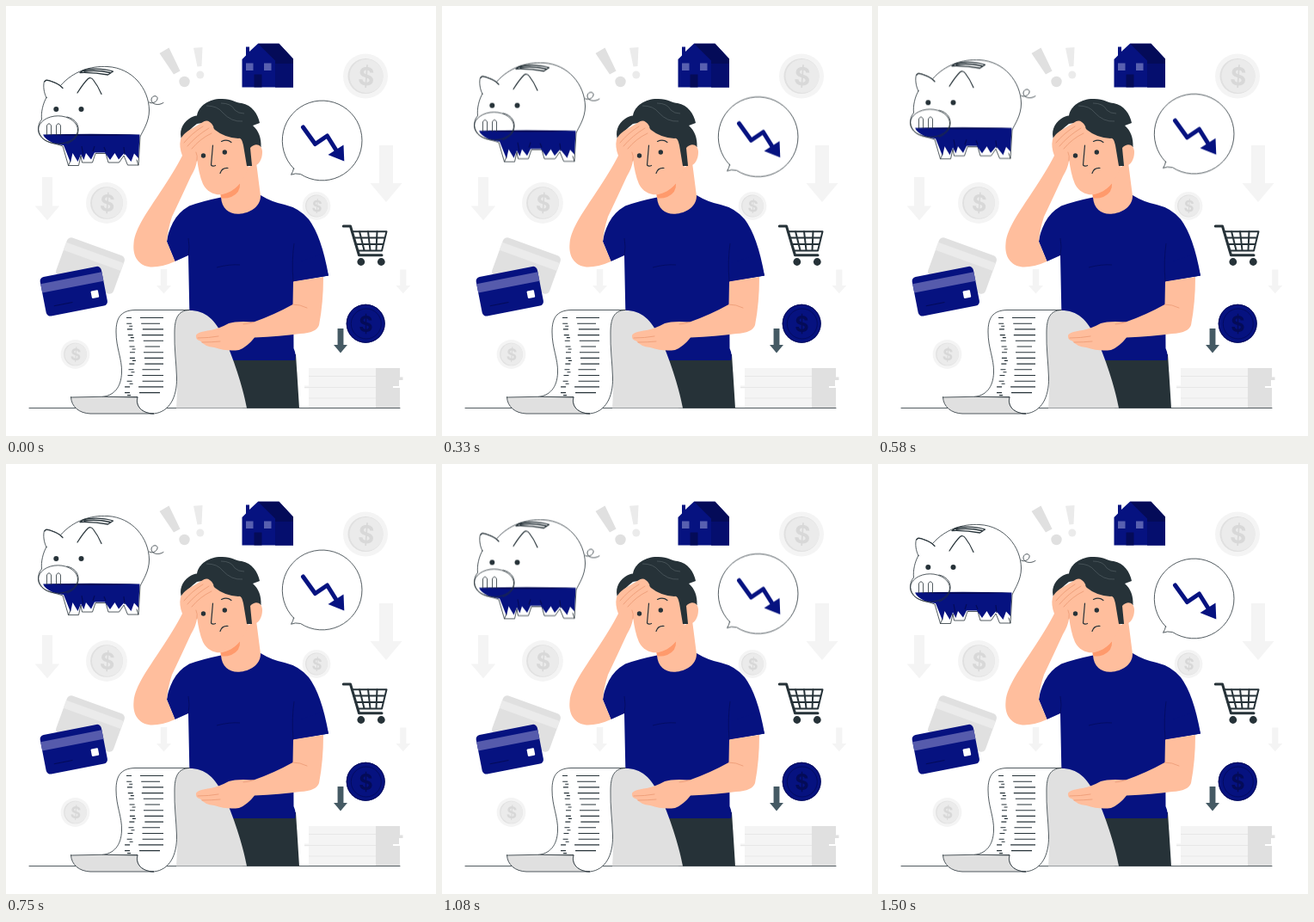
Recreate the animation shown at these times as an HTML page. Size 500 px wide and 500 px high, loop 1540 ms.

```html
<!DOCTYPE html>
<html lang="en">
<head>
<meta charset="utf-8">
<title>Money worries</title>
<style>
  html, body { margin: 0; width: 100%; height: 100%; overflow: hidden; background: #fff; }
  svg { display: block; width: 100vw; height: 100vh; }
  .navy { fill: #061280; }
  .deep { fill: #040b58; }
  .dark { fill: #263238; }
  .skin { fill: #ffbe9d; }
  .g1 { fill: #e0e0e0; }
  .g2 { fill: #ebebeb; }
  .g3 { fill: #f4f4f4; }
  .white { fill: #fff; }
  .ink { stroke: #263238; stroke-width: .8; stroke-linecap: round; stroke-linejoin: round; }
  .line { fill: none; }
  .crease { fill: none; stroke: #eb9a74; stroke-width: .8; stroke-linecap: round; }
  text { font: 700 29px Inter, "Open Sans", sans-serif; text-anchor: middle; }
  .float { animation: float 1540ms linear infinite; }
  @keyframes float {
    0%, 97.4%, 100% { transform: translateY(0); }
    48.7% { transform: translateY(-10px); }
  }
</style>
</head>
<body>
<svg viewBox="0 0 500 500" preserveAspectRatio="none">
  <defs>
    <g id="coin">
      <circle class="g3" r="26"/>
      <circle class="g1" r="20.5"/>
      <circle class="g2" cx="1" r="19.5"/>
      <text class="g1" x="1" y="10.5" transform="rotate(4)" style="fill:#d8d8d8">$</text>
    </g>
    <path id="down" d="M-8 0H8V44H18.5L0 66L-18.5 44H-8Z"/>
  </defs>

  <!-- backdrop -->
  <g class="g1">
    <path d="M178.500 55L189.500 48.500L202.500 75.500L195 79.500Z"/>
    <circle cx="207.500" cy="88" r="6.200"/>
  </g>
  <g class="g2">
    <path d="M218 48.800L228.500 48L227.500 70L222.500 70.500Z"/>
    <circle cx="225.800" cy="80" r="4.500"/>
  </g>
  <use href="#coin" x="418" y="81.500"/>
  <use href="#coin" transform="translate(117 229) scale(.92)"/>
  <use href="#coin" transform="translate(361 232.500) scale(.63)"/>
  <use href="#coin" transform="translate(80.500 405) scale(.65)"/>
  <g class="g3">
    <use href="#down" x="442" y="162"/>
    <use href="#down" transform="translate(48 199) scale(.77 .76)"/>
    <use href="#down" transform="translate(183.500 306) scale(.46 .43)"/>
    <use href="#down" transform="translate(461.800 306.500) scale(.45 .42)"/>
  </g>
  <path class="g3" d="M352 421H430V467H352V444.500H347V441.500H352Z"/>
  <path class="g1" d="M430 421H458V431.500H461.500V435H457V442H450V444H458V467H430Z"/>
  <path class="line" stroke="#e4e4e4" stroke-width=".8" d="M352 430.500H430M347 443.500H430M352 456H430"/>

  <!-- house -->
  <path class="navy" d="M274.500 94.500V62L279 57.500V47.500H283V53L293 43.700H317.500L334 61.500V94.500Z"/>
  <path class="deep" d="M293 43.700H317.500L334 61.500V94.500H313V63.500Z"/>
  <path class="navy" opacity=".55" d="M313 67H334V94.500H313Z"/>
  <path class="deep" d="M288.500 79.500H297.500V94.500H288.500Z"/>
  <path fill="#5860b0" d="M279 66.500H287.500V75H279ZM300 66.500H308.500V75H300Z"/>

  <!-- cards -->
  <g transform="rotate(20 98 302)">
    <rect class="g1" x="62.500" y="278.500" width="71" height="47" rx="5"/>
    <path class="g2" d="M62.500 286H133.500V295.500H62.500Z"/>
  </g>
  <g transform="rotate(-11 78.700 331.500)">
    <rect class="navy" x="42.500" y="308.500" width="72.500" height="46.500" rx="5"/>
    <path fill="#565bac" d="M42.500 316H115V326.500H42.500Z"/>
    <rect class="white" x="98" y="335.500" width="8.500" height="8.500" rx="1"/>
    <path class="line" stroke="#040b58" stroke-width="1" d="M53 344H75"/>
  </g>

  <!-- cart -->
  <g class="line" stroke="#263238" stroke-linecap="round" stroke-linejoin="round">
    <path stroke-width="3" d="M392.300 256H400.500L410.500 289.800H437"/>
    <path stroke-width="2" d="M402.500 262.300H442.500L437 284.500H409M404 269.500H440.500M406.500 277H439M411 262L416.500 284M421 262L423.500 284M431.500 262L430.500 284"/>
  </g>
  <circle class="dark" cx="412.800" cy="297.500" r="4.400"/>
  <circle class="dark" cx="436.300" cy="297.500" r="4.400"/>

  <!-- falling coin -->
  <circle class="navy" cx="418.200" cy="369.300" r="22.500"/>
  <circle class="line" cx="418.200" cy="369.300" r="22" stroke="#040b58"/>
  <circle class="line" cx="418.800" cy="369.500" r="17.500" stroke="#040b58" stroke-width=".8"/>
  <text class="deep" x="418.500" y="378.500" style="font-size:25px">$</text>
  <use href="#down" fill="#455a64" transform="translate(389 375) scale(.43)"/>

  <!-- table -->
  <path class="line ink" d="M27 467.500H458"/>

  <!-- piggy bank -->
  <g class="float">
    <path class="white ink" d="M47 106.500C44 101 43 93 44.500 87.500Q46 85 50 86.500Q58 89 63.500 92.500C78 76 98 69.500 118 70.500C147 72 166 96 166.500 121C166.500 135 159 145 156 152L154 185H141.500L137 174L131.500 182H119L116 171.500H104L100.500 182H88.500L87 174L84.500 185.500H72.500L66 163C58 160 49 159 44 155C36 148 36 138 41.500 132C40.500 124 43 113 47 106.500Z"/>
    <path class="navy" d="M43 149.500H155.500L154 177L149 171.500L145.500 181L137.500 171L131 178.500L126.500 171L121 179L115 170.500H103L99 178.500L93 171L90.500 179L87 172.500L83.500 181L77.500 171L75 182L67 162C58 160.500 47 158 43 149.500Z"/>
    <path class="deep" d="M43 149.500Q98 147.800 155.500 149.500Q98 152.500 43 149.500Z"/>
    <path class="line" stroke="#040b58" stroke-width="1.200" d="M88 163L90 174M101 169L103 163M116 169L114 164M137 164L138 173"/>
    <g class="line ink">
      <ellipse cx="60.500" cy="144" rx="23" ry="16.200"/>
      <path d="M71 129C81 131 86 139 83.500 148C82 154 76 158 71 160"/>
      <path d="M47.500 150V139Q50 134.500 52.500 139V150M58.500 150V139Q61 134.500 63.500 139V150"/>
      <path stroke-width="1.200" d="M45 88Q46 85.500 51 87Q61 90 66 95.500M83 101Q90 90 95 85Q98.500 82 101.500 86Q107 93 111 102.500"/>
      <path stroke-width="1.300" d="M86 77.500Q90 74 96 73.500Q112 72 124.500 76L118.500 80Q103 77 86 77.500ZM91 76Q106 74 121 77.500"/>
      <path d="M166.500 112C171 115 177 110 176 106.500C174.500 103 168.500 105 169 109.500C170 115 178 116 183 112.500"/>
      <path d="M72.500 185.500L75 180M154 185L152 179"/>
    </g>
    <circle class="dark" cx="58.300" cy="120" r="3"/>
    <circle class="dark" cx="87.500" cy="120" r="3"/>
  </g>

  <!-- speech bubble -->
  <g class="float">
    <path class="white ink" d="M334.500 189A46.400 46.400 0 1 1 342.500 195.500Q336 194 331.500 196.200Q334 192.500 334.500 189Z"/>
    <path class="line" stroke="#061280" stroke-width="5" stroke-linecap="round" stroke-linejoin="round" d="M345.500 141L359.500 160.500L373.500 151L386 171"/>
    <path class="navy" d="M374.500 173L392.500 161.500L393.300 180.500Z"/>
  </g>

  <!-- man -->
  <path class="dark" d="M258 405H337L341 467.500H275Z"/>
  <path class="navy" d="M250 222.500Q228 227 213 232.500Q200 240 194 252Q188 264 187 274L196.500 297L212 290L214.500 412H336Q338 406 334.500 398L334 320.500L375 313.500Q367 268 352 248Q341 235 324 231Q309 228 296 220Z"/>
  <path class="skin" d="M248 208L250 222.500C251 237 261 243 273 241.500C287 240 296 231 296 221L291 182Z"/>
  <path fill="#ff9a6c" d="M249.500 219Q263 217 272 206Q273 217 262 222Q255 224.500 250 223Z"/>
  <path class="skin" d="M220 150C221 168 222 190 229 207C234 217 244 220.500 252 219C265 216 275 206 281 190L288 168L270 138L232 128Z"/>
  <path class="dark" d="M204.500 156C201 147 204 137 213 131Q218 127.500 222 127.500C224 116 236 108 250 108C262 107.500 268 113 274 113C286 115 293 126 295 136L287 139C294 145 297 154 296.500 164L289 167L286 186H280L276 162Q274 152 270 154Q254 153 243 144Q234 134 222 137Q211 145 204.500 156Z"/>
  <path class="skin" d="M284 165C290 158.500 298 161 298 170C298 179 293 187 286 185.500Z"/>
  <path class="line" stroke="#5b676c" stroke-width=".6" d="M233 116Q246 116 252 124Q262 135 275 134M250 113Q262 113 266 121Q270 125 277 125"/>
  <circle class="dark" cx="229.500" cy="174" r="2.700"/>
  <circle class="dark" cx="254.300" cy="170" r="2.700"/>
  <path class="line ink" stroke-linecap="round" style="stroke-width:1.200" d="M250.500 157.500Q257 154.500 262 158.500M240.500 162L238.500 185Q240.500 187 243.500 185.500M249 194.500Q251 188 258 188.500"/>

  <!-- raised arm -->
  <path class="skin" d="M203 155Q205 150 212 145L228 135.500Q233 132 237 135Q243 139 241 146Q243 150 237 153L229 163Q226 173 222 180Q221 188 215 198Q204 222 193 245Q188 260 187 274L196.500 297Q181 304 168 303.500C154 302 147 291 148.500 276C150 258 166 237 179 217Q197 190 205 174Q201 164 203 155Z"/>
  <path class="crease" d="M207 159Q216 148 229 140M211 163Q221 151 236 142M216 166Q226 154 239 148M222 180Q223 174 221 170"/>

  <!-- receipt -->
  <path class="g1" d="M213 354C200 354 196 363 196.500 382C197 412 201 432 198 467.500H280C277 450 267 415 254 387C243 364 232 354 213 354Z"/>
  <path class="white ink" d="M213 353.500H150C133 354 128 363 128 379C128 398 135 410 134.500 426C134 444 125 453 112 454.500H153C150 465 158 474 172 474C190 472 199 455 198.500 432C198 415 195.500 397 196 380C196 363 200 354 213 353.500Z"/>
  <path class="g1 ink" d="M75.500 455Q113 453.500 153 455C150 465 158 474 172 474H98C85 473.500 76 466 75.500 455Z"/>
  <g id="rows" class="line" stroke="#263238" stroke-width="1.100"></g>

  <!-- lower arm -->
  <path class="skin" d="M334 320L333.500 347Q312 359 288 367.500Q268 366 259 369Q248 375 238 377Q222 379 221 383Q220 388 226 389.500Q231 396 242 397Q257 402 271 400Q281 396 289 385.500Q319 384 342 381Q361 380 364 371Q369 345 369 315Z"/>
  <path class="crease" d="M333.500 347Q342 347 350 351M223 386Q236 386 247 384M228 391Q239 391 249 390M288 367.500Q281 370 276 370"/>
  <path class="navy" d="M333 300V320.500L375 313.500L368 288Z"/>
  <path class="line" stroke="#040b58" stroke-width=".7" d="M334 320.500Q332 296 335 276M212 290Q214 280 212 270M245 304Q260 300 272 301"/>
</svg>
<script>
  // Receipt rows sway with the curl of the sheet.
  let d = "";
  for (let i = 0; i < 14; i++) {
    const y = 362.5 + i * 6.7;
    const x = 142 + 2 * Math.sin(i / 2 - 1.6) - (i > 11 ? 2 : 0);
    const end = 183 - (i % 4 === 1 ? 4 : 0);
    d += `M${x} ${y}h6M${x + 16 + (i % 3)} ${y}H${end}`;
    if (i % 2) d += `M${x + 3} ${y + 3}h4`;
  }
  const rows = document.createElementNS("http://www.w3.org/2000/svg", "path");
  rows.setAttribute("d", d);
  document.getElementById("rows").append(rows);
</script>
</body>
</html>
```
